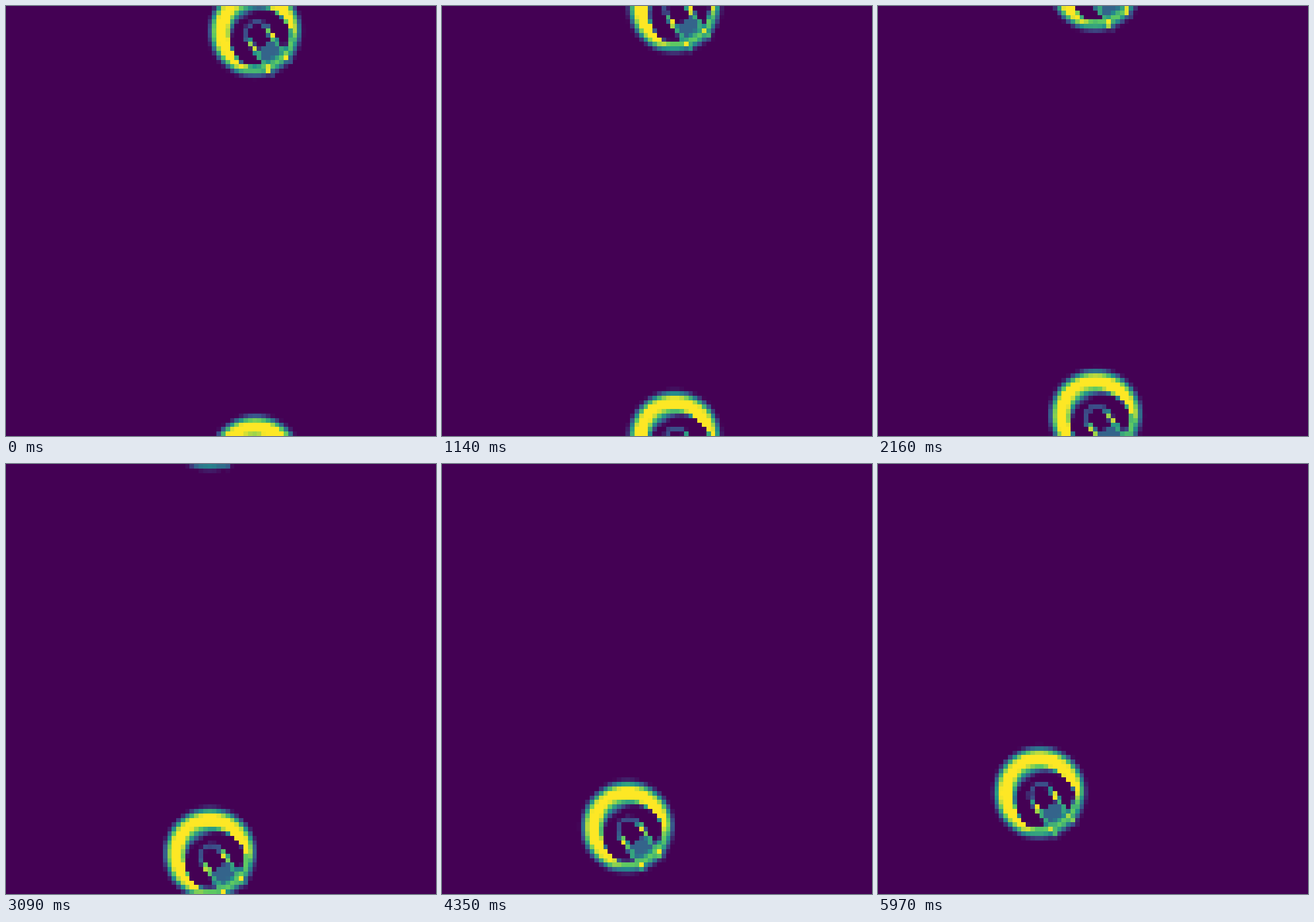
An HTML page with a canvas that plays this animation: 748x748 px, repeating every 6000 ms.

```html
<!DOCTYPE html>
<html lang="en">
<head>
<meta charset="utf-8">
<title>Glider</title>
<style>
html, body { margin: 0; width: 100%; height: 100%; overflow: hidden; background: #440154; }
canvas { display: block; }
</style>
</head>
<body>
<canvas id="stage" width="748" height="748"></canvas>
<script>
const ctx = document.getElementById('stage').getContext('2d');
const SIZE = 748, GRID = 96, STEP = 30, STEPS = 200, REACH = 13;
const start = { x: 55.51, y: 5.4 };
const vel = { x: -0.0983, y: -0.1419 };
const speed = Math.hypot(vel.x, vel.y);
const dir = { x: vel.x / speed, y: vel.y / speed };
const strip = 2.45; // half-width of the inner strip, in cells

const viridis = [[68, 1, 84], [59, 82, 139], [33, 145, 140], [94, 201, 98], [253, 231, 37]];

const clamp = x => Math.max(0, Math.min(1, x));
const bump = (x, mid, width) => Math.exp(-(((x - mid) / width) ** 2));
const smooth = (a, b, x) => {
  const k = clamp((x - a) / (b - a));
  return k * k * (3 - 2 * k);
};

function color(v) {
  const p = clamp(v) * (viridis.length - 1);
  const i = Math.min(viridis.length - 2, Math.floor(p));
  return `rgb(${viridis[i].map((c, k) => Math.round(c + (viridis[i + 1][k] - c) * (p - i)))})`;
}

// In body space u points forward and w to the side.
const inside = (u, w) => smooth(-1.5, 1.5, 9.6 - Math.hypot(u + 0.25, w));

function crescent(u, w) {
  const angle = Math.abs(Math.atan2(w, u)) * 180 / Math.PI;
  const rear = smooth(122, 142, angle);
  const hole = 7 * (Math.hypot((u + 2.5) / 7.6, w / 6.75) - 1);
  const inner = Math.max(hole, Math.hypot(u, w) - 8);
  const soft = Math.max(0.3, 2.2 - angle * 0.02) + 0.3 * rear;
  return clamp(1.08 * inside(u, w) * smooth(-soft, soft, inner)) * (1 - 0.25 * rear);
}

// A faint cap in front, running back into two bright parallel lines.
function outline(u, w) {
  const d = Math.abs((u > -0.9 ? Math.hypot(u + 0.9, w) : Math.abs(w)) - strip);
  const level = 0.24 + 0.34 * smooth(0, -1.6, u) + 0.45 * (bump(u, -2.8, 1.1) + bump(u, -8.8, 1));
  return level * smooth(-11.4, -9.2, u) * clamp((0.75 - d) / 0.4);
}

function fill(u, w) {
  if (Math.abs(w) > strip) return 0;
  return (0.32 * smooth(-3.7, -4.2, u) + 0.36 * smooth(-6.8, -8.4, u)) * inside(u, w);
}

const wrap = n => (n % GRID + GRID) % GRID;
const edge = n => Math.round(n * SIZE / GRID);

function drawCell(col, row, v) {
  const x = edge(wrap(col)), y = edge(wrap(row));
  ctx.fillStyle = color(v);
  ctx.fillRect(x, y, edge(wrap(col) + 1) - x, edge(wrap(row) + 1) - y);
}

function draw(step) {
  const cx = start.x + vel.x * step, cy = start.y + vel.y * step;
  ctx.fillStyle = color(0);
  ctx.fillRect(0, 0, SIZE, SIZE);
  for (let row = Math.floor(cy) - REACH; row <= cy + REACH; row++) {
    for (let col = Math.floor(cx) - REACH; col <= cx + REACH; col++) {
      const x = col + 0.5 - cx, y = row + 0.5 - cy;
      const u = x * dir.x + y * dir.y;
      const w = y * dir.x - x * dir.y;
      const v = Math.max(crescent(u, w), outline(u, w), fill(u, w));
      if (v > 0.01) drawCell(col, row, v);
    }
  }
}

const t0 = performance.now();
let last = -1;
function tick() {
  const step = Math.floor((performance.now() - t0) / STEP) % STEPS;
  if (step !== last) draw(last = step);
  requestAnimationFrame(tick);
}
tick();
</script>
</body>
</html>
```
